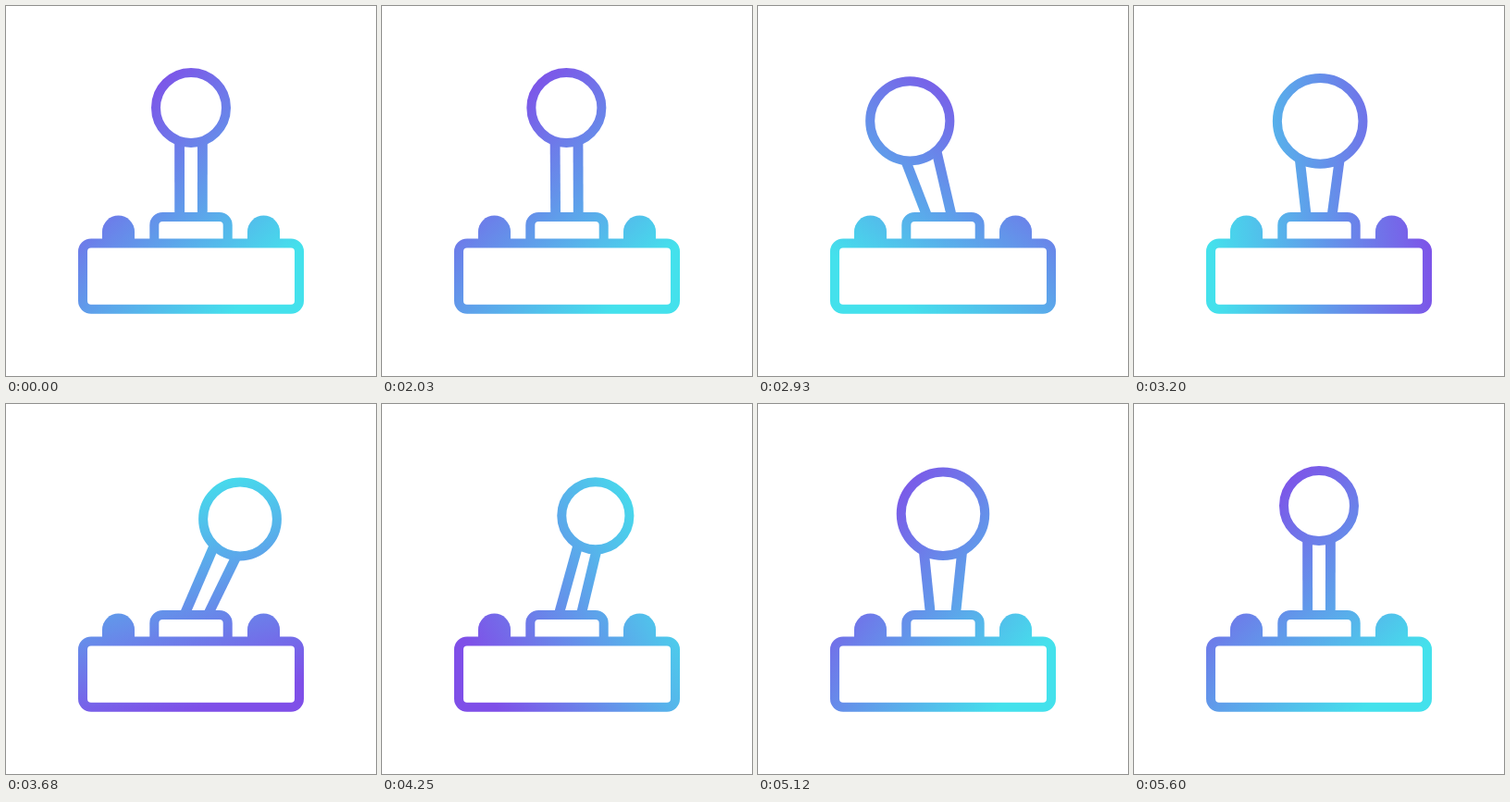
An HTML page without scripts for the animation above (5660 ms loop, 400 by 400 pixels).

```html
<!DOCTYPE html>
<html lang="en">
<head>
<meta charset="utf-8">
<title>Joystick</title>
<style>
  @property --x { syntax: "<number>"; inherits: true; initial-value: 200; }
  @property --y { syntax: "<number>"; inherits: true; initial-value: 110; }
  @property --r { syntax: "<number>"; inherits: true; initial-value: 38; }

  html, body { margin: 0; width: 100%; height: 100%; overflow: hidden; background: #fff; }
  svg { display: block; width: 100%; height: 100%; animation: push 5.66s linear infinite; }

  .outline { fill: #000; stroke: #fff; stroke-width: 10; }

  .knob {
    cx: calc(var(--x) * 1px);
    cy: calc(var(--y) * 1px);
    r: calc(var(--r) * 1px);
  }

  /* Each rod aims from its foot to a point beside the knob centre;
     the gap widens as the knob comes closer. */
  .rod {
    --gap: calc(12.5 + 1.7 * (var(--r) - 38));
    stroke: #fff;
    stroke-width: 10.8;
    transform-origin: calc(var(--foot) * 1px) 240px;
    rotate: atan2(calc(var(--x) + var(--side) * var(--gap) - var(--foot)), calc(240 - var(--y)));
  }
  .left { --side: -1; --foot: 187.7; }
  .right { --side: 1; --foot: 212.3; }

  .paint { transform-origin: 200px 205px; animation: turn 5.66s linear infinite; }

  @keyframes push {
    0%, 35.6% { --x: 200; --y: 110; --r: 38; }
    36.93% { --x: 197; --y: 110.2; --r: 38; }
    38.34% { --x: 189; --y: 111.3; --r: 38.1; }
    39.58% { --x: 178; --y: 113; --r: 38.2; }
    40.81% { --x: 165.5; --y: 116; --r: 38.3; }
    42.05% { --x: 156; --y: 118.6; --r: 38.4; }
    43.29% { --x: 150.5; --y: 120; --r: 38.4; }
    45.23% { --x: 147.7; --y: 121; --r: 38.8; }
    47.7% { --x: 150; --y: 122.5; --r: 40; }
    50.35% { --x: 157.5; --y: 124; --r: 42; }
    53% { --x: 170; --y: 124.6; --r: 44; }
    55.48% { --x: 188.5; --y: 124.5; --r: 45.6; }
    56.54% { --x: 201; --y: 124.4; --r: 46.3; }
    58.66% { --x: 224; --y: 125; --r: 45.9; }
    60.78% { --x: 240; --y: 125.2; --r: 44.3; }
    62.9% { --x: 249; --y: 125; --r: 42; }
    65.02% { --x: 253; --y: 124.5; --r: 39.9; }
    67.14% { --x: 254.5; --y: 124; --r: 38.6; }
    69.79% { --x: 251.5; --y: 123; --r: 37.6; }
    72.44% { --x: 243; --y: 122; --r: 37; }
    75.62% { --x: 228.5; --y: 120.5; --r: 36.5; }
    79.15% { --x: 214; --y: 115.5; --r: 36; }
    82.51% { --x: 204.6; --y: 111; --r: 37; }
    84.1% { --x: 202; --y: 112; --r: 39.6; }
    85.69% { --x: 200.5; --y: 116; --r: 43; }
    87.63% { --x: 200; --y: 119; --r: 45.5; }
    89.05% { --x: 200; --y: 119.5; --r: 46; }
    90.99% { --x: 200; --y: 118.5; --r: 45; }
    93.29% { --x: 200; --y: 115; --r: 42.5; }
    95.76% { --x: 200; --y: 112.5; --r: 40; }
    97.35% { --x: 200; --y: 111; --r: 38.8; }
    98.94%, 100% { --x: 200; --y: 110; --r: 38; }
  }

  @keyframes turn {
    0%, 35.6% { rotate: 45deg; }
    39.58% { rotate: 50deg; }
    43.29% { rotate: 64deg; }
    47.7% { rotate: 92deg; }
    52.12% { rotate: 130deg; }
    56.54% { rotate: 174deg; }
    60.78% { rotate: 216deg; }
    65.02% { rotate: 255deg; }
    70.67% { rotate: 303deg; }
    76.5% { rotate: 344deg; }
    82.51% { rotate: 375deg; }
    88.34% { rotate: 393deg; }
    93.64% { rotate: 402deg; }
    98.94%, 100% { rotate: 405deg; }
  }
</style>
</head>
<body>
<svg viewBox="0 0 400 400">
  <defs>
    <linearGradient id="hue" gradientUnits="userSpaceOnUse" x1="77.5" y1="205" x2="322.5" y2="205">
      <stop stop-color="#7f4fe8"/>
      <stop offset="1" stop-color="#44e1ec"/>
    </linearGradient>
    <path id="button" d="M-17.5 256V244a17.5 17.5 0 0 1 35 0V256z" fill="#fff"/>
    <mask id="joystick" maskUnits="userSpaceOnUse" x="0" y="0" width="400" height="400">
      <path class="rod left" d="M187.7 240v-105"/>
      <path class="rod right" d="M212.3 240v-105"/>
      <circle class="outline knob"/>
      <path class="outline" d="M160.3 256V237a9 9 0 0 1 9-9H230.7a9 9 0 0 1 9 9V256"/>
      <use href="#button" x="121.5"/>
      <use href="#button" x="278.5"/>
      <rect class="outline" x="83" y="256.5" width="234" height="71.3" rx="9"/>
    </mask>
  </defs>
  <g mask="url(#joystick)">
    <rect class="paint" x="-200" y="-200" width="800" height="800" fill="url(#hue)"/>
  </g>
</svg>
</body>
</html>
```
